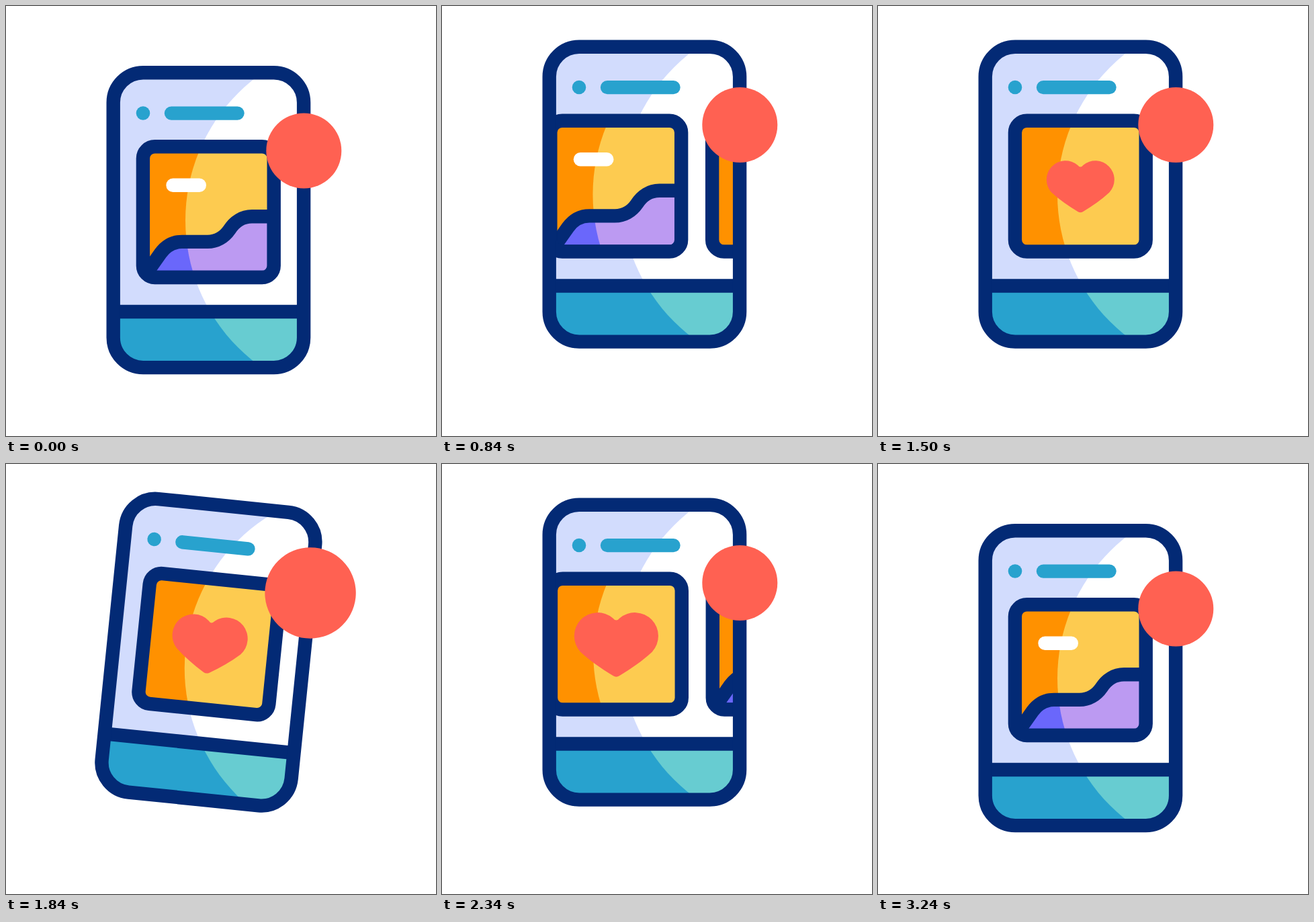
Animation of 640x640 px, one loop 3.42 s. Source, as an HTML page:

```html
<!DOCTYPE html>
<html>
<head>
<meta charset="utf-8">
<style>
  html, body { margin: 0; height: 100%; overflow: hidden; background: #fff; }
  svg { display: block; width: 100vw; height: 100vh; }
  .line { fill: none; stroke: #032a75; stroke-width: 20.4; }
  .bar { stroke-width: 20.4; stroke-linecap: round; }
</style>
</head>
<body>
<svg viewBox="0 0 640 640">
  <defs>
    <clipPath id="screen"><rect x="159.7" y="99.3" width="283.4" height="438.8" rx="44.5"/></clipPath>
    <clipPath id="frame"><rect x="203.9" y="209.2" width="194.8" height="194.8" rx="17.6"/></clipPath>
    <clipPath id="light"><circle cx="534.8" cy="319" r="267.8"/></clipPath>
    <path id="hill" d="M206 402L230 368C238 357 249 350.9 262 350.9H300C313 350.9 325 344 332.5 333C340 321 352 313.2 366 313.2H399V404H206Z"/>
    <rect id="edge" class="line" x="203.9" y="209.2" width="194.8" height="194.8" rx="17.6"/>
    <g id="paper">
      <rect x="200" y="205" width="205" height="205" fill="#ff9100"/>
      <rect x="200" y="205" width="205" height="205" fill="#fdcb50" clip-path="url(#light)"/>
    </g>
    <g id="picture">
      <g clip-path="url(#frame)">
        <use href="#paper"/>
        <use href="#hill" fill="#6a67fb"/>
        <g clip-path="url(#light)"><use href="#hill" fill="#bc9af2"/></g>
        <use href="#hill" class="line"/>
      </g>
      <path class="bar" d="M248.5 266.8H287.8" stroke="#fff"/>
      <use href="#edge"/>
    </g>
  </defs>
  <g id="phone">
    <g clip-path="url(#screen)">
      <rect x="150" y="90" width="304" height="460" fill="#d2dcfd"/>
      <rect x="150" y="455" width="304" height="95" fill="#28a2ce"/>
      <g clip-path="url(#light)">
        <rect x="150" y="90" width="304" height="365" fill="#fff"/>
        <rect x="150" y="455" width="304" height="95" fill="#67ccd1"/>
      </g>
      <circle cx="204" cy="159.5" r="10.3" fill="#28a2ce"/>
      <path class="bar" d="M246 159.6H344.5" stroke="#28a2ce"/>
      <g id="cards">
        <use href="#picture"/>
        <g transform="translate(240.8)">
          <g clip-path="url(#frame)"><use href="#paper"/></g>
          <use href="#edge"/>
          <path id="heart" fill="#ff6152" d="M-4-31.6A28.2 28.2 0 0 0-43 9C-31 20-18 29-4 37.5Q0 40 4 37.5C18 29 31 20 43 9A28.2 28.2 0 0 0 4-31.6Q0-26.5-4-31.6Z"/>
        </g>
        <use href="#picture" x="481.6"/>
      </g>
    </g>
    <path class="line" d="M160 455H443"/>
    <rect class="line" x="159.7" y="99.3" width="283.4" height="438.8" rx="44.5"/>
    <circle id="badge" cx="443.3" cy="215.5" r="56" fill="#ff6152"/>
  </g>
</svg>
<script>
  const LOOP = 3420, PITCH = 240.8, SWING = [0, -6, 6, -6, 0], BEAT = 125;
  const [phone, cards, heart, badge] =
    ['phone', 'cards', 'heart', 'badge'].map(id => document.getElementById(id));

  // Smooth ramp from 0 to 1 between two times
  const ramp = (t, from, to) => {
    const s = Math.min(1, Math.max(0, (t - from) / (to - from)));
    return s * s * (3 - 2 * s);
  };

  function tilt(t, start) {
    let angle = 0;
    for (let i = 1; i < SWING.length; i++) {
      const from = start + (i - 1) * BEAT;
      angle += (SWING[i] - SWING[i - 1]) * ramp(t, from, from + BEAT);
    }
    return angle;
  }

  const pulse = (t, start) =>
    ramp(t, start, start + 250) - ramp(t, start + 250, start + 500);

  function draw(now) {
    const t = now % LOOP;
    const lift = 38.5 * (ramp(t, 0, 250) - ramp(t, 3000, 3240));
    const angle = tilt(t, 100) + tilt(t, 1600);
    const slide = PITCH * (ramp(t, 600, 1500) + ramp(t, 2102, 3002));
    const beat = 1 + 0.24 * ramp(t, 1600, 2100);
    phone.setAttribute('transform', `translate(0 ${-lift}) rotate(${angle} 301.4 318.7)`);
    cards.setAttribute('transform', `translate(${-slide})`);
    heart.setAttribute('transform', `translate(301.3 307.1) scale(${beat})`);
    badge.setAttribute('r', 56 * (1 + 0.21 * (pulse(t, 100) + pulse(t, 1600))));
    requestAnimationFrame(() => draw(performance.now()));
  }
  draw(performance.now());
</script>
</body>
</html>
```
